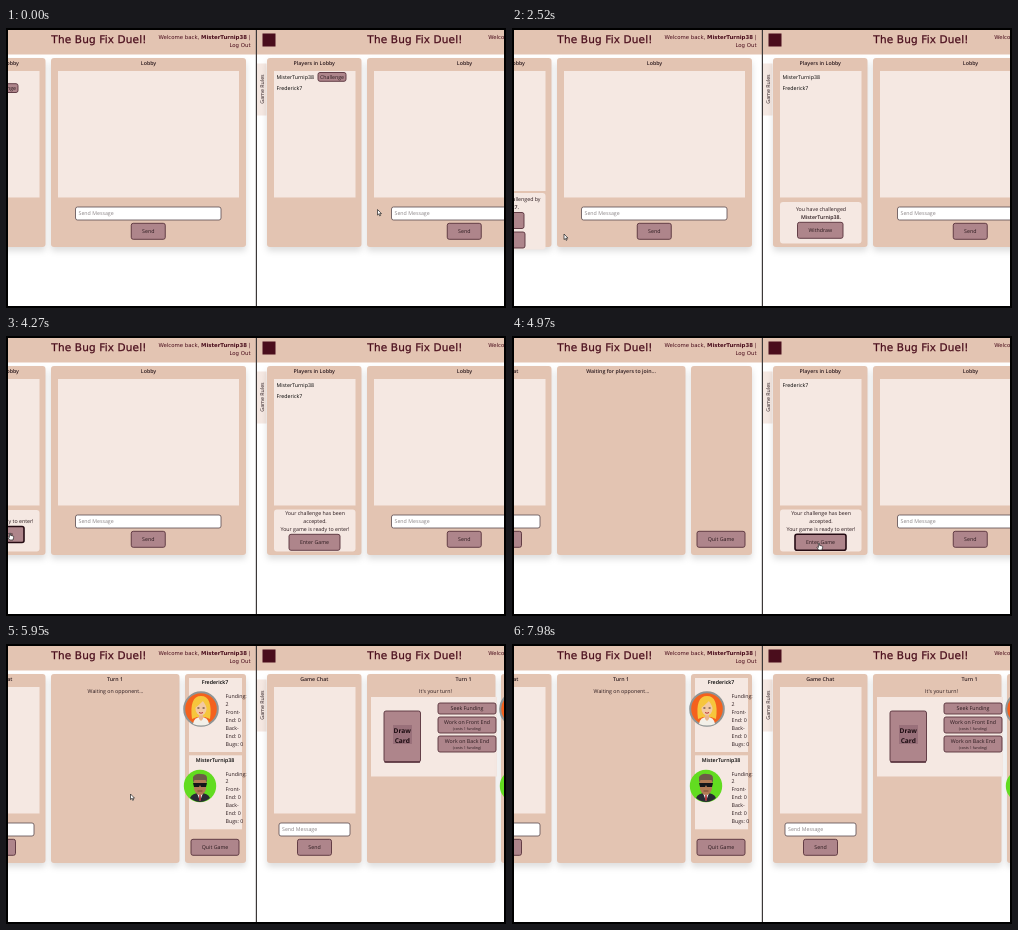
An HTML page for the animation above (8000 ms loop, 500 by 280 pixels).

```html
<!DOCTYPE html>
<html lang="en">
<head>
<meta charset="utf-8">
<title>Two-player lobby</title>
<style>
  html, body { margin: 0; width: 100%; height: 100%; overflow: hidden; background: #000; }
  svg { display: block; width: 100vw; height: 100vh; }
  text { font: 5.27px "Open Sans", "Noto Sans", sans-serif; fill: #2b1a1e; text-anchor: middle; text-rendering: geometricPrecision; }
  .start { text-anchor: start; }
  .semi { font-weight: 600; }
  .name { fill: #000; }
  .hint { fill: #8c8688; text-anchor: start; }
  .tiny { font-size: 3.7px; }
  .draw { font-size: 6.6px; font-weight: 700; fill: #1d0c11; }
  .title, .user { font-family: "DejaVu Sans", sans-serif; fill: #4a0d1c; }
  .title { font-size: 10.5px; letter-spacing: .15px; stroke: #4a0d1c; stroke-width: .25px; }
  .user { font-size: 5.4px; text-anchor: end; }
  .user tspan { font-weight: 700; }
  .panel { fill: #e3c4b2; filter: drop-shadow(0 4px 3px #0002); }
  .inner { fill: #f5e8e2; }
  .button { fill: #ae858b; stroke: #57323c; stroke-width: .9; }
  .hot { stroke: #260c14; stroke-width: 1.6; }
  .input { fill: #fff; stroke: #5a4b4e; stroke-width: .8; }
</style>
</head>
<body>
<svg id="stage" viewBox="0 0 500 280" xmlns="http://www.w3.org/2000/svg"></svg>
<script>
const LOOP = 8000, STEP = 70;
const SHIFT = -316; // the left window shows the same page, scrolled sideways
const GUEST = "MisterTurnip38", HOST = "Frederick7";

const rect = (cls, x, y, w, h, r = 0) =>
  `<rect class="${cls}" x="${x}" y="${y}" width="${w}" height="${h}" rx="${r}"/>`;
const text = (str, x, y, cls = "") => `<text class="${cls}" x="${x}" y="${y}">${str}</text>`;
const lines = (list, x, y, gap, cls) => list.map((s, i) => text(s, x, y + i * gap, cls)).join("");
const button = (label, x, y, w, h, cls = "") =>
  rect("button " + cls, x, y, w, h, 2) + text(label, x + w / 2, y + h / 2 + 1.9);
const panel = (title, x, w, mid = x + w / 2) =>
  rect("panel", x, 30, w, 189, 3) + text(title, mid, 37.3, "semi");
const chatForm = (x, w) => rect("input", x, 179, w, 13, 2) +
  text("Send Message", x + 3, 187.4, "hint") + button("Send", x + w / 2 - 17, 195.3, 34, 16);

const chrome = user => `
  <rect x="240" y="0" width="330" height="280" fill="#fff"/>
  <rect x="240" y="0" width="330" height="26.5" fill="#e3c4b2"/>
  <rect x="256.5" y="5.5" width="13" height="13" fill="#4a0d1c"/>
  ${text("The Bug Fix Duel!", 409, 15.4, "title")}
  <text class="user" x="560.5" y="11">Welcome back, <tspan>${user}</tspan> |</text>
  ${text("Log Out", 560.5, 19, "user")}
  ${rect("inner", 250, 35.5, 10.5, 52)}
  <text transform="translate(258 61) rotate(-90)">Game Rules</text>`;

const lobby = (names, extra, listHeight = 126.5) =>
  panel("Players in Lobby", 261, 94.5) + rect("inner", 268, 43, 81.5, listHeight) +
  panel("Lobby", 361, 195) + rect("inner", 368, 43, 181, 126.5) + chatForm(385.5, 145.5) +
  lines(names, 270.5, 50.8, 11.4, "start name") + extra;

const challenge = (x, y, cls) => button("Challenge", x, y, 28, 8.8, cls);
const notice = (y, h) => rect("inner", 268, y, 81.5, h, 3);

const pending = notice(174, 41.5) + text("You have challenged", 309, 182.8) +
  text(GUEST + ".", 309, 190.8, "semi") + button("Withdraw", 285.5, 194.3, 45.5, 16);
const challenged = notice(165, 56.5) + text("You have been challenged by", 309, 173) +
  text(HOST + ".", 309, 181, "semi") +
  button("Accept", 290, 184.5, 38, 16) + button("Decline", 289, 204, 40, 16);
const ready = cls => notice(174, 41.5) + text("Your game is ready to enter!", 309, 187) +
  button("Enter Game", 283, 190.5, 51, 16, cls);
const accepted = cls => notice(173.5, 42) +
  lines(["Your challenge has been", "accepted.", "Your game is ready to enter!"], 309, 179, 7.9) +
  button("Enter Game", 283, 198.3, 51, 16, cls);

const game = (title, mid, middle, side = "") =>
  panel("Game Chat", 261, 94.5) + rect("inner", 268, 43, 81.5, 126.5) + chatForm(273, 71) +
  panel(title, 361, 128.5, mid) + middle + panel("", 495, 61) + side +
  button("Quit Game", 501, 195.3, 48, 16);

const STATS = ["Funding:", "2", "Front-", "End: 0", "Back-", "End: 0", "Bugs: 0"];
const playerCard = (name, y, face) => rect("inner", 499, y, 53, 74) +
  text(name, 525, y + 6.2, "semi name") + face + lines(STATS, 535.5, y + 20.2, 7.95, "start");

const blonde = `<g transform="translate(511 65)">
  <circle r="16.8" fill="#f4611d" stroke="#8f9494" stroke-width="2"/>
  <path d="M-9 10C-11 -5-8 -13 0 -13S11 -5 9 10L4 8H-4Z" fill="#f6c63c"/>
  <path d="M-8 15Q-7 8 0 8T8 15Q0 18-8 15" fill="#f3f0e8"/>
  <path d="M-2 4H2V10L0 12L-2 10Z" fill="#e9b58d"/>
  <ellipse cy="-1" rx="5.6" ry="7.4" fill="#f3c9a2"/>
  <path d="M-6 -1Q-5 -10 2 -10Q6 -8 6 -1Q4 -5 2 -8Q-2 -4-6 -1" fill="#f6c63c"/>
  <path d="M-3.6 -1H-1.6M1.6 -1H3.6" stroke="#382522"/>
  <path d="M-2 3.5Q0 5 2 3.5" fill="none" stroke="#b9343a"/></g>`;
const shades = `<g transform="translate(510 142)">
  <circle r="16.2" fill="#62dc20"/>
  <path d="M-10 12Q-8 7 0 7T10 12Q0 20-10 12" fill="#282b33"/>
  <path d="M-3 7H3L0 15Z" fill="#f4f4f4"/>
  <path d="M-.8 9H.8L1 14L0 15L-1 14Z" fill="#b03038"/>
  <path d="M-6 -7H6V3Q4 9 0 9T-6 3Z" fill="#b27a55"/>
  <path d="M-7 -3V-9Q-4 -13 1 -12Q7 -12 7 -8V-3L5.5 -6H-5.5Z" fill="#6d5b48"/>
  <path d="M-7 -3H7L6 1H1L0 -1L-1 1H-6Z" fill="#15161a"/>
  <path d="M-2.5 5H2.5" stroke="#6b3d2c" stroke-width=".8"/></g>`;
const players = playerCard(HOST, 34, blonde) + playerCard(GUEST, 111.3, shades);

const workButton = (label, y) => rect("button", 432, y, 58, 16, 2) +
  text(label, 461, y + 7.2) + text("(costs 1 funding)", 461, y + 12.8, "tiny");
const actions = text("It's your turn!", 429.5, 49) + rect("inner", 365, 53, 126, 79.5) +
  rect("button", 378, 67, 36.5, 51, 2) +
  `<rect x="387" y="81" width="19" height="19" fill="#99707a"/>
   <path d="M378.5 118H414" stroke="#57323c" stroke-width="1.6"/>` +
  lines(["Draw", "Card"], 396.3, 89, 9.6, "draw") +
  button("Seek Funding", 432, 59, 58, 11) +
  workButton("Work on Front End", 73) + workButton("Work on Back End", 92);

// each window: [time it appears, content]
const both = [GUEST, HOST];
const leftScenes = [
  [0, lobby(both, challenge(300, 55.7))],
  [1750, lobby(both, challenged, 120)],
  [2870, lobby(both, ready(""))],
  [4130, lobby(both, ready("hot"))],
  [4410, game("Waiting for players to join...", 425, "")],
  [5180, game("Turn 1", 425, text("Waiting on opponent...", 425.5, 49), players)]
];
const rightScenes = [
  [0, lobby(both, challenge(312, 44.5))],
  [1330, lobby(both, challenge(312, 44.5, "hot"))],
  [1680, lobby(both, pending)],
  [2940, lobby(both, accepted(""))],
  [4480, lobby([HOST], accepted(""))],
  [4830, lobby([HOST], accepted("hot"))],
  [5110, game("Turn 1", 457.5, actions, players)]
];

const view = (id, user, scenes, dx) => `<g clip-path="url(#${id}Clip)"><g transform="translate(${dx})">
  ${chrome(user)}${scenes.map(s => `<g class="${id}">${s[1]}</g>`).join("")}</g></g>`;

document.getElementById("stage").innerHTML = `
  <clipPath id="leftClip"><rect x="2" y="2" width="248" height="276"/></clipPath>
  <clipPath id="rightClip"><rect x="250" y="2" width="248" height="276"/></clipPath>
  <rect width="500" height="280"/>
  ${view("left", GUEST, leftScenes, SHIFT)}
  ${view("right", HOST, rightScenes, 0)}
  <rect x="249.8" y="2" width="1.2" height="276" fill="#3c3838"/>
  <g id="cursor" stroke="#222" stroke-width=".7" fill="#fff" stroke-linejoin="round">
    <path id="arrow" d="M0 0V5.6L1.3 4.4L2.2 6.4L3.1 6L2.2 4.1H4Z"/>
    <path id="hand" d="M-.6 .4Q0 -.5 .6 .4V2.4L3.2 3Q3.8 3.3 3.6 4.4L3 7H-.4L-2 4.4Q-1.8 3.5-.6 4.4Z"/>
  </g>`;

// cursor path: [time, x, y]
const path = [
  [0, 371.5, 181.5], [70, 371.5, 181.5], [350, 335, 95], [560, 306, 40], [840, 304, 58],
  [1050, 304, 58], [1120, 309, 57.5], [1400, 326, 49], [1960, 326, 49],
  [2240, 200, 130], [2520, 52, 206], [2800, 7, 193], [2870, 7, 193],
  [3640, 4, 197], [4130, 4, 197], [4410, 4, 197], [4620, 130, 204],
  [4900, 307, 207], [5110, 307, 207], [5460, 205, 172], [5740, 124.5, 150], [LOOP, 124.5, 150]
];
const handTimes = [[1330, 1890], [2730, 4410], [4830, 5110]];
const HIDE_AT = 7840;

const cursor = document.getElementById("cursor");
const arrow = document.getElementById("arrow");
const hand = document.getElementById("hand");
const show = (el, on) => { el.style.display = on ? "" : "none"; };

function cursorAt(t) {
  const i = path.findIndex(p => p[0] > t);
  const [t0, x0, y0] = path[i - 1], [t1, x1, y1] = path[i];
  const k = (t - t0) / (t1 - t0);
  return [x0 + (x1 - x0) * k, y0 + (y1 - y0) * k];
}

function pick(id, scenes, t) {
  const now = scenes.filter(s => s[0] <= t).length - 1;
  document.querySelectorAll("g." + id).forEach((g, i) => show(g, i === now));
}

function frame() {
  const t = Math.floor(performance.now() % LOOP / STEP) * STEP;
  pick("left", leftScenes, t);
  pick("right", rightScenes, t);
  const pointing = handTimes.some(([a, b]) => t >= a && t < b);
  show(arrow, !pointing);
  show(hand, pointing);
  show(cursor, t < HIDE_AT);
  cursor.setAttribute("transform", `translate(${cursorAt(t)})`);
  requestAnimationFrame(frame);
}
frame();
</script>
</body>
</html>
```
